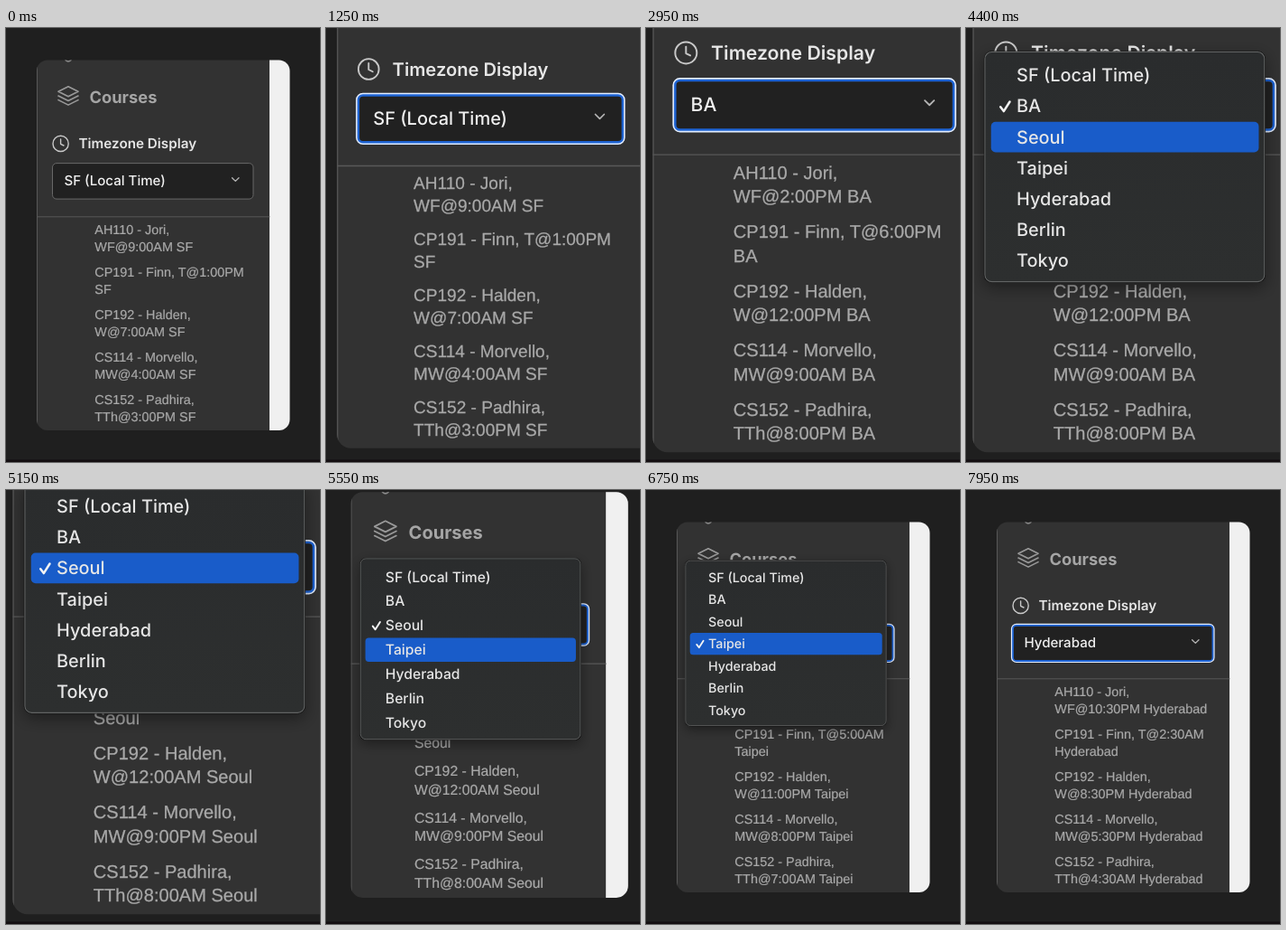
Animation of 348 by 480 pixels, one loop 8000 ms. Source, as an HTML page:

```html
<!DOCTYPE html>
<html lang="en">
<head>
<meta charset="utf-8">
<title>Timezone display</title>
<style>
  html, body { margin: 0; width: 100%; height: 100%; overflow: hidden; background: #1f1f1f; }
  svg { display: block; width: 348px; height: 480px; text-rendering: geometricPrecision; }
  text { font-family: Inter, Roboto, sans-serif; white-space: pre; }
  .line { fill: none; stroke-linecap: round; stroke-linejoin: round; }
  #list text { font: 14.4px "Liberation Sans", Arial, sans-serif; fill: #a9a9a9; stroke: #a9a9a9; stroke-width: .2; }
  #menu text { font-size: 14.3px; font-weight: 500; fill: #e6e6e6; }
</style>
</head>
<body>
<svg viewBox="0 0 348 480">
  <defs>
    <clipPath id="card"><rect x="34" y="35.5" width="280.5" height="409.5" rx="12"/></clipPath>
    <linearGradient id="glass" x1="0" y1="0" x2="0" y2="1">
      <stop offset="0" stop-color="#2a2c2d"/>
      <stop offset="1" stop-color="#2d2f2f"/>
    </linearGradient>
    <filter id="shadow" x="-20%" y="-20%" width="140%" height="150%">
      <feDropShadow dx="0" dy="4" stdDeviation="6" flood-color="#000" flood-opacity=".4"/>
    </filter>
  </defs>
  <rect width="348" height="480" fill="#1f1f1f"/>
  <g id="camera">
    <g clip-path="url(#card)">
      <rect x="34" y="35" width="281" height="411" fill="#323232"/>
      <rect x="292" y="35" width="23" height="411" fill="#f0f0f0"/>
      <path class="line" d="M34.5 35V446M34 208.8H292" stroke="#585858"/>
      <path class="line" d="M66 35.5q3 3 6 0" stroke="#8c8c8c" stroke-width="1.6"/>
      <path class="line" d="M69 64.8l11 5.5-11 5.5-11-5.5zM58 75l11 5.5 11-5.5M58 79.6l11 5.5 11-5.5" stroke="#999" stroke-width="1.6"/>
      <text x="92.5" y="82.8" font-size="18.3" font-weight="700" fill="#a5a5a5">Courses</text>
      <g class="line" stroke="#c8c8c8" stroke-width="1.4">
        <circle cx="60.6" cy="127.9" r="8.6"/>
        <path d="M60.6 123v5.3l3.4 1.7"/>
      </g>
      <text x="80.5" y="133.4" font-size="15.25" font-weight="600" fill="#e6e6e6">Timezone Display</text>
      <g transform="translate(0 -.4)">
        <rect x="51.5" y="150" width="222.5" height="39.5" rx="4.5" fill="#212121" stroke="#686868"/>
        <g id="ring" fill="none">
          <rect x="51.8" y="150" width="221.9" height="39.6" rx="4" stroke="#1d62d2" stroke-width="2.2"/>
          <rect x="50.5" y="148.7" width="224.5" height="42.2" rx="5.3" stroke="#e2edff" stroke-width="1.2"/>
        </g>
        <text id="value" x="64.4" y="174.9" font-size="15.1" font-weight="500" fill="#f0f0f0"></text>
        <path class="line" d="M250.6 166.1l3.7 3.7 3.7-3.7" stroke="#b4b4b4" stroke-width="1.3"/>
      </g>
      <g id="list"></g>
    </g>
    <g id="menu">
      <g filter="url(#shadow)">
        <rect x="43" y="-.5" width="224" height="184" rx="6" fill="#111"/>
      </g>
      <rect x="43.8" y=".3" width="222.4" height="182.4" rx="5.4" fill="url(#glass)" stroke="#626464" stroke-width=".8"/>
      <rect id="hover" x="48.7" width="213" height="24.2" rx="3.6" fill="#195cc9"/>
      <path id="check" class="line" d="M56.2 .6l2.6 3.4 4.8-7.6" stroke="#f4f4f4" stroke-width="1.8"/>
    </g>
  </g>
  <rect y="477.5" width="348" height="2.5" fill="#130d10"/>
</svg>
<script>
const LOOP = 8000, PITCH = 24.55, FIRST = 18.8;
const ORIGIN = { x: 102, y: 383.5 }, ZOOM = 0.393, SPRING = 7.5;
const ZOOM_IN = 833, ZOOM_OUT = 5187, FOCUS = 1200, FADE = 150;

// Zone label and hours ahead of the first one
const zones = [["SF", 0], ["BA", 5], ["Seoul", 17], ["Taipei", 16], ["Hyderabad", 13.5], ["Berlin"], ["Tokyo"]];
const courses = [
  ["AH110 - Jori,", "WF", 9],
  ["CP191 - Finn,", "T", 13],
  ["CP192 - Halden,", "W", 7],
  ["CS114 - Morvello,", "MW", 4],
  ["CS152 - Padhira,", "TTh", 15]
];
// Each menu moves the choice from one zone to the next
const menus = [
  { open: 1300, move: 2250, pick: 2750 },
  { open: 3750, move: 4200, pick: 4550 },
  { open: 5000, move: 5400, pick: 5800 },
  { open: 6400, move: 6950, pick: 7300 }
];

const $ = id => document.getElementById(id);
const label = i => i ? zones[i][0] : "SF (Local Time)";

function addText(parent, x, y, content = "") {
  const node = document.createElementNS("http://www.w3.org/2000/svg", "text");
  node.setAttribute("x", x);
  node.setAttribute("y", y);
  node.textContent = content;
  parent.append(node);
  return node;
}

function clock(hours) {
  const h = hours % 24, whole = Math.floor(h);
  const minutes = String((h - whole) * 60).padStart(2, "0");
  return `${whole % 12 || 12}:${minutes}${whole < 12 ? "AM" : "PM"}`;
}

const rows = courses.map((_, i) => [228, 246.9].map(y => addText($("list"), 98.3, y + 47 * i)));
zones.forEach((_, i) => addText($("menu"), 69, FIRST + 5 + PITCH * i, label(i)));

let shown = -1;
function showZone(index) {
  if (index === shown) return;
  shown = index;
  $("value").textContent = label(index);
  const [zone, shift] = zones[index];
  courses.forEach(([title, days, hour], i) => {
    const time = `${days}@${clock(hour + shift)}`;
    const lines = i === 1 ? [`${title} ${time}`, zone] : [title, `${time} ${zone}`];
    rows[i].forEach((node, k) => node.textContent = lines[k]);
  });
}

// Critically damped spring from 0 to 1
function spring(ms) {
  const x = Math.max(0, ms) / 1000 * SPRING;
  return 1 - (1 + x) * Math.exp(-x);
}

function showMenu(t) {
  const index = menus.findIndex(m => t >= m.open && t < m.pick + FADE);
  $("menu").style.display = index < 0 ? "none" : "";
  if (index < 0) return;
  const { move, pick } = menus[index];
  const centre = i => FIRST + PITCH * i;
  $("menu").setAttribute("transform", `translate(0 ${151.5 - PITCH * index})`);
  $("menu").style.opacity = 1 - Math.max(0, t - pick) / FADE;
  $("hover").setAttribute("y", centre(index + (t >= move ? 1 : 0)) - 12.2);
  $("check").setAttribute("transform", `translate(0 ${centre(index)})`);
}

function draw(t) {
  const scale = 1 + ZOOM * (spring(t - ZOOM_IN) - spring(t - ZOOM_OUT));
  const { x, y } = ORIGIN;
  $("camera").setAttribute("transform", `translate(${x} ${y}) scale(${scale}) translate(${-x} ${-y})`);
  $("ring").style.display = t >= FOCUS ? "" : "none";
  showZone(menus.filter(m => t >= m.pick).length);
  showMenu(t);
}

const start = performance.now();
function tick() {
  draw((performance.now() - start) % LOOP);
  requestAnimationFrame(tick);
}
tick();
</script>
</body>
</html>
```
